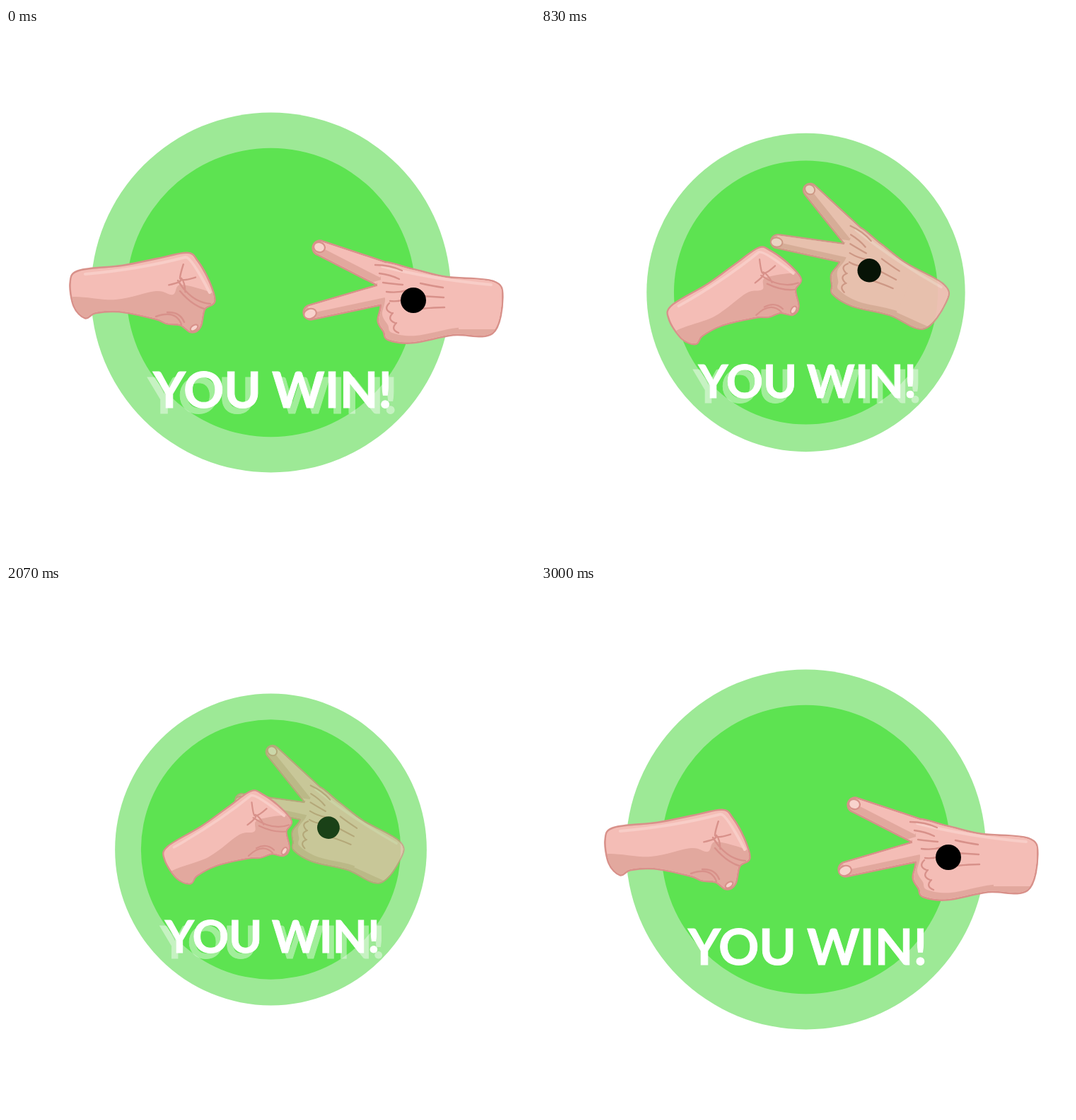
Recreate the animation shown at these times as an HTML page. Size 748x748 px, loop 3.03 s.

```html
<!DOCTYPE html>
<html lang="en">
<head>
<meta charset="utf-8">
<title>You win!</title>
<style>
  html, body { margin: 0; width: 100%; height: 100%; overflow: hidden; background: #fff; }
  svg { display: block; width: 100vw; height: 100vh; }
  text { font: 700 71px Lato, "Open Sans", sans-serif; fill: #fff; stroke: #fff; }
  path { stroke-linecap: round; stroke-linejoin: round; }
  .skin { fill: #f4bdb6; }
  .shade { fill: #e2a89e; }
  .light { fill: none; stroke: #f8cdc7; stroke-width: 4; }
  .line { fill: none; stroke: #d8918a; stroke-width: 2.4; }
  .edge { fill: none; stroke: #d8918a; stroke-width: 5.2; }
  .nail { fill: #f8d3cd; stroke: #d8918a; stroke-width: 2.2; }
</style>
</head>
<body>
<svg viewBox="0 0 748 748">
  <defs>
    <text id="you" x="361" y="537" text-anchor="end">YOU</text>
    <text id="win" x="376" y="537">WIN!</text>
  </defs>
  <circle id="ring" cx="374.5" cy="374" fill="#9de996"/>
  <circle id="disc" cx="374.5" cy="374" fill="#5de351"/>
  <g id="words">
    <g id="shadow" opacity=".42"><use href="#you" x="-7.5" y="8"/><use href="#win" x="7.5" y="8"/></g>
    <use href="#you"/><use href="#win"/>
  </g>
  <g id="hand"></g>
  <g id="fist"></g>
</svg>

<script>
const LOOP = 3030, END = 3000;
const $ = id => document.getElementById(id);
const repeat = (n, f) => Array.from({ length: n }, (_, i) => f(i)).join("");

// Smooth closed curve through a few points
function blob(points) {
  const at = i => points[(i + points.length) % points.length];
  const knot = (i, side) => [0, 1].map(k => at(i)[k] + side * (at(i + 1)[k] - at(i - 1)[k]) / 6);
  return "M" + at(0) + repeat(points.length, i => `C${knot(i, 1)} ${knot(i + 1, -1)} ${at(i + 1)}`) + "Z";
}

// Tapered finger with a round tip
function finger(x, y, r, rootX, rootY, rootR) {
  const a = Math.atan2(rootY - y, rootX - x);
  const side = (px, py, d) => [px - d * Math.sin(a), py + d * Math.cos(a)];
  return `M${side(rootX, rootY, rootR)}L${side(x, y, r)}A${r} ${r} 0 0 1 ${side(x, y, -r)}L${side(rootX, rootY, -rootR)}Z`;
}

const nail = (x, y, rx, ry, turn) =>
  `<ellipse class="nail" rx="${rx}" ry="${ry}" transform="translate(${x} ${y}) rotate(${turn})"/>`;

function build(id, shape, tones, details) {
  $(id).innerHTML = `<clipPath id="${id}Clip"><path d="${shape}"/></clipPath>
    <path class="edge" d="${shape}"/><path class="skin" d="${shape}"/>
    <g clip-path="url(#${id}Clip)">${tones}</g>${details}`;
}

const palm = blob([[530, 333], [575, 342], [622, 353], [688, 359], [701, 381], [687, 431], [632, 433],
  [575, 444], [541, 440], [535, 429], [527, 414], [531, 392], [525, 364]]);
const handShape = palm + finger(444, 311, 9, 530, 347, 16) + finger(431, 402, 9, 530, 377, 13);
build("hand", handShape,
  `<path class="shade" d="${handShape}"/><path class="skin" d="${handShape}" transform="translate(5 -9)"/>
   <path class="skin" d="M640 350h70v76h-70z"/><path class="light" d="M532 337Q600 355 686 363"/>`,
  `<path class="line" d="M522 335Q543 335 560 343${
    repeat(3, i => `M${586 + i} ${361 + i * 18}q18 ${4 - i * 3} 32 ${6 - i * 4}`)}${
    repeat(4, i => `M${528 + i * 5} ${347 + i * 13}q16 2 28 ${8 - i * 5}`)}${
    repeat(3, i => `M${542 + i * 5} ${389 + i * 14}q-9 9 3 14`)}"/>
   ${nail(443, 310, 8, 7, 18)}${nail(430, 404, 9, 7, -18)}<circle cx="576" cy="385" r="18"/>`);

const fistShape = blob([[104, 344], [92, 360], [97, 393], [112, 409], [126, 402], [160, 400], [210, 410],
  [228, 417], [247, 419], [262, 429], [274, 422], [280, 397], [294, 386], [286, 358], [270, 330],
  [256, 319], [215, 327], [165, 337]]);
build("fist", fistShape,
  `<path class="shade" d="${blob([[80, 384], [155, 384], [212, 372], [236, 377], [250, 363], [310, 388], [290, 445], [90, 445]])}"/>
   <path class="light" d="M112 348Q190 341 254 324Q262 324 288 374"/>`,
  `<path class="line" d="${repeat(4, i => {
    const a = (78 * i - 82) * Math.PI / 180;
    return `M248 354q${5 * Math.sin(a)} 5 ${20 * Math.cos(a)} ${20 * Math.sin(a)}`;
  })}M246 372Q262 391 280 397M243 357Q262 388 289 390M212 408Q240 398 248 419M228 402Q246 401 252 416"/>
   ${nail(266, 424, 6, 3.6, -35)}`);

function ramp(t, from, to) {
  const u = Math.min(1, Math.max(0, (t - from) / (to - from)));
  return u * u * (3 - 2 * u);
}

function place(id, x, y, dx, dy, turn, size) {
  $(id).setAttribute("transform",
    `translate(${x + dx} ${y + dy}) rotate(${turn}) scale(${size}) translate(${-x} ${-y})`);
}

function draw(t) {
  const pulse = ramp(t, 0, END / 2) * ramp(t, END, END / 2);
  $("ring").setAttribute("r", 254.5 - 50.5 * pulse);
  $("disc").setAttribute("r", 204.3 - 30.6 * pulse);
  place("words", 374, 374, 0, 0, 0, 1 - .15 * pulse);
  $("shadow").setAttribute("visibility", t < END ? "visible" : "hidden");

  // Hands meet, the fist winds up and strikes, then both retreat
  const leave = ramp(t, END, 2290);
  const meet = ramp(t, 0, 540) * leave;
  const shrink = ramp(t, 0, END / 2) * leave;
  const windup = t > 540 && t < 1120 ? Math.sin(Math.PI * (t - 540) / 580) ** 2 : 0;
  const fade = ramp(t, 650, 1150) * ramp(t, 2500, 2120);
  place("fist", 189, 371, 121 * meet - 40 * windup, 22 * windup - 10 * meet, -24.3 * meet, 1 - .09 * shrink);
  place("hand", 609, 375, 10 * windup - 123 * meet, -28 * meet, 24.3 * meet, 1 - .12 * shrink);
  $("hand").setAttribute("opacity", 1 - .29 * fade);
}

const start = performance.now();
function tick() {
  draw((performance.now() - start) % LOOP);
  requestAnimationFrame(tick);
}
tick();
</script>
</body>
</html>
```
